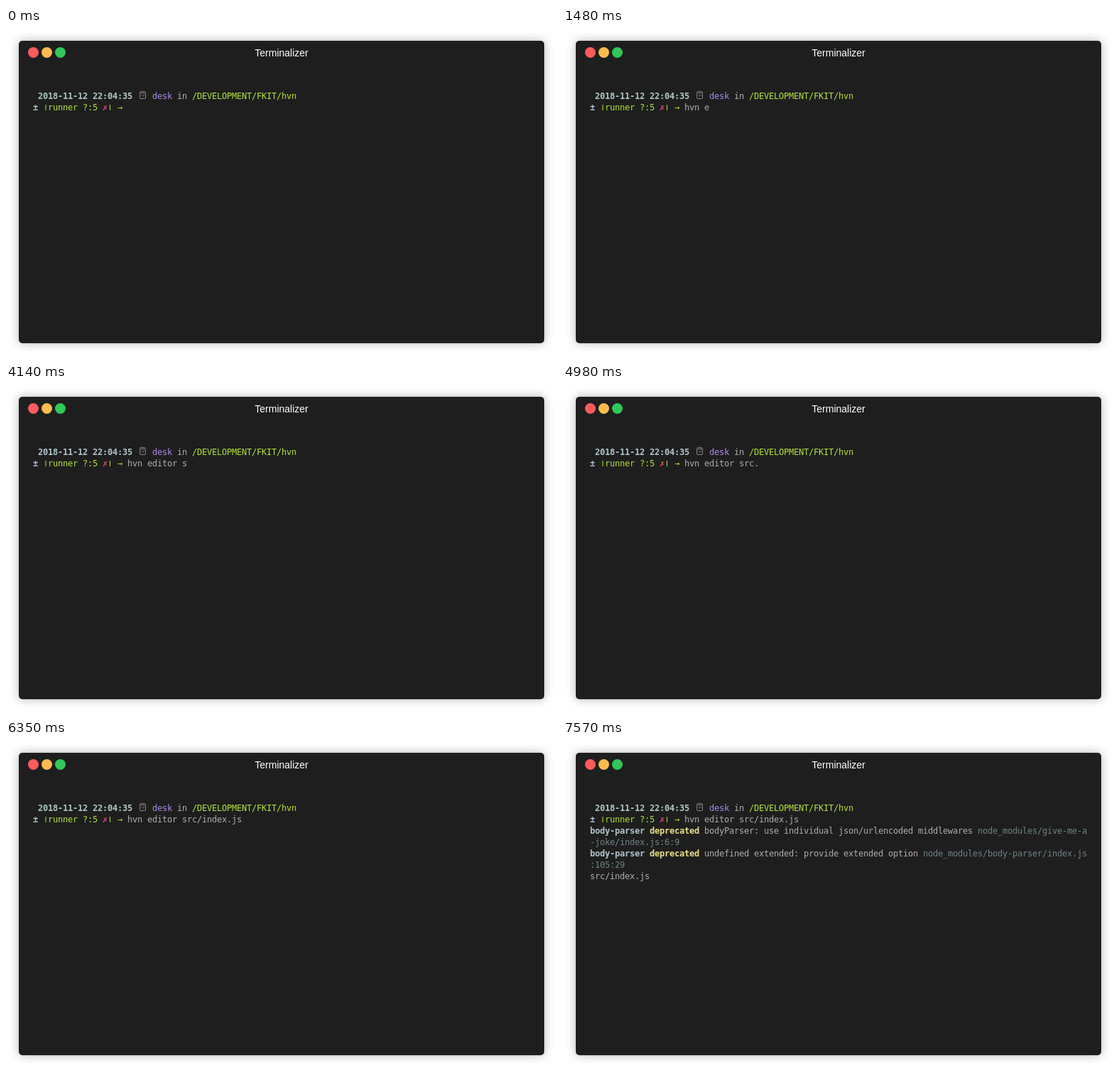
These frames come from a looping animation (776x462 px, 8000 ms). An HTML page:

```html
<!DOCTYPE html>
<html lang="en">
<head>
<meta charset="utf-8">
<title>Terminal</title>
<style>
  html, body { margin: 0; width: 100%; height: 100%; overflow: hidden; background: #fff; }
  .window {
    position: absolute; left: 18px; top: 18px; width: 740px; height: 426px;
    border-radius: 5px; background: #1e1e1e; box-shadow: 0 0 14px rgba(0, 0, 0, .3);
  }
  svg { position: absolute; left: 0; top: 0; display: block; }
  #screen text { font: 12px "DejaVu Sans Mono", monospace; white-space: pre; fill: #afafaf; }
  #screen .bold { font-weight: bold; fill: #b1c6ca; }
  #screen .warn { font-weight: bold; fill: #ebdf86; }
  #screen .green { fill: #b3e33b; }
  #screen .red { fill: #fc4a72; }
  #screen .purple { fill: #ae89e8; }
  #screen .dim { fill: #708387; }
  .title { font: 14px "Liberation Sans", Arial, sans-serif; fill: #fff; text-anchor: middle; }
</style>
</head>
<body>
<div class="window"></div>
<svg width="776" height="462" viewBox="0 0 776 462">
  <circle cx="38.5" cy="34.5" r="7.5" fill="#fc5b5d"/>
  <circle cx="57.5" cy="34.5" r="7.5" fill="#fdbc50"/>
  <circle cx="76.5" cy="34.5" r="7.5" fill="#30c85b"/>
  <text class="title" x="388" y="40">Terminalizer</text>
  <g fill="none" stroke="#858585">
    <rect x="188.5" y="91.5" width="8" height="8" rx="1.5"/>
    <path d="M188 91.5L189.5 89.5H195.5L197 91.5M190.5 94L192.5 96L195 94"/>
  </g>
  <path d="M55.5 108h1v8h-1zM146 108h1v8h-1z" fill="#b3e33b"/>
  <g id="screen"></g>
</svg>
<script>
const LOOP = 8000, LEFT = 38, CELL = 7, COLUMNS = 100, BASELINE = 100, ROW = 16;
const screen = document.getElementById("screen");

// Pins every character to its terminal cell.
function addText(row, column, content, style = "") {
  const node = document.createElementNS("http://www.w3.org/2000/svg", "text");
  const cells = Array.from({ length: COLUMNS - column }, (_, i) => LEFT + (column + i) * CELL);
  node.setAttribute("x", cells.join(" "));
  node.setAttribute("y", BASELINE + row * ROW);
  node.setAttribute("class", style);
  node.textContent = content;
  screen.append(node);
  return node;
}

addText(0, 1, "2018-11-12 22:04:35", "bold");
addText(0, 24, "desk", "purple");
addText(0, 29, "in");
addText(0, 32, "/DEVELOPMENT/FKIT/hvn", "green");
addText(1, 0, "±", "bold");
addText(1, 3, "runner ?:5", "green");
addText(1, 14, "✗", "red");
addText(1, 17, "→", "green");
const command = addText(1, 19, "");

const warnings = [
  addText(2, 0, "body-parser", "bold"),
  addText(2, 12, "deprecated", "warn"),
  addText(2, 23, "bodyParser: use individual json/urlencoded middlewares"),
  addText(2, 78, "node_modules/give-me-a", "dim"),
  addText(3, 0, "-joke/index.js:6:9", "dim"),
  addText(4, 0, "body-parser", "bold"),
  addText(4, 12, "deprecated", "warn"),
  addText(4, 23, "undefined extended: provide extended option"),
  addText(4, 67, "node_modules/body-parser/index.js", "dim"),
  addText(5, 0, ":105:29", "dim")
];
const result = addText(6, 0, "src/index.js");

// Each entry is [time, keys]; "<" erases one character.
const keys = [
  [730, "h"], [850, "v"], [970, "n"], [1480, " e"], [1780, "d"],
  [2040, "i"], [2140, "t"], [2240, "o"], [2340, "r"],
  [4140, " s"], [4290, "r"], [4470, "c"], [4980, "."], [5310, "<"],
  [5460, "/"], [5630, "i"], [5810, "n"], [6070, "d"], [6220, "e"], [6350, "x.js"]
];

const show = (node, on) => node.setAttribute("visibility", on ? "visible" : "hidden");

function render(time) {
  const typed = keys.reduce((line, [at, key]) =>
    time < at ? line : key === "<" ? line.slice(0, -1) : line + key, "");
  if (command.textContent !== typed) command.textContent = typed;
  warnings.forEach(node => show(node, time >= 7530));
  show(result, time >= 7570);
}

const start = performance.now();
function tick() {
  render((performance.now() - start) % LOOP);
  requestAnimationFrame(tick);
}
tick();
</script>
</body>
</html>
```
